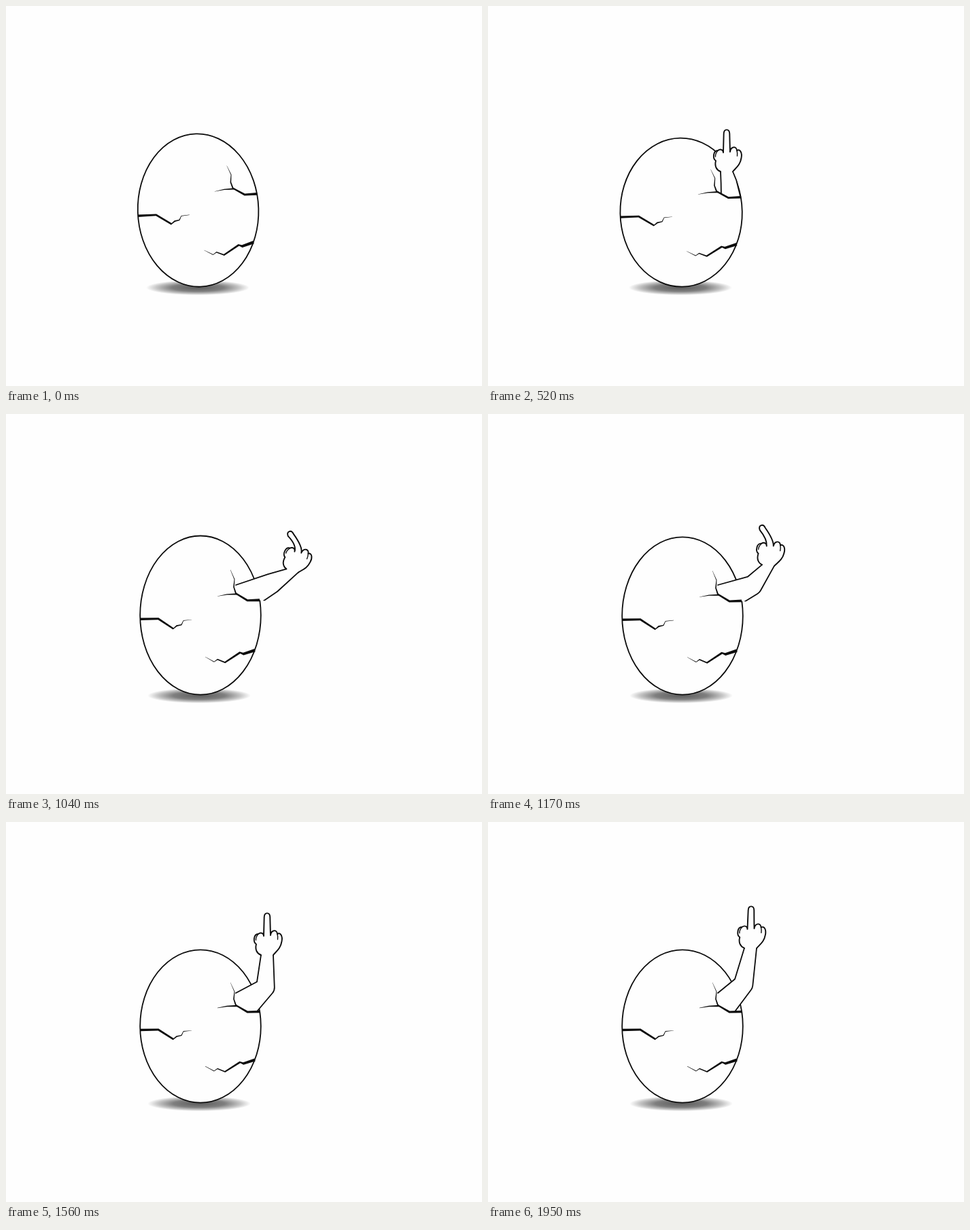
Recreate the animation shown at these times as an HTML page with a canvas. Size 700 by 560 pixels, loop 2340 ms.

```html
<!DOCTYPE html>
<html lang="en">
<head>
<meta charset="utf-8">
<title>Hatching egg</title>
<style>
  html, body { margin: 0; width: 100%; height: 100%; overflow: hidden; background: #fefefe; }
  canvas { display: block; width: 700px; height: 560px; }
</style>
</head>
<body>
<canvas id="stage" width="700" height="560"></canvas>
<script>
const ctx = document.getElementById('stage').getContext('2d');
const PAPER = '#fefefe', INK = '#0c0c0c';
const STEP = 130, STEPS = 18;

// centre lines, from the thick end to the tip
const sideCrack = [[197, 306.5], [224, 306], [246, 320], [251, 316], [258, 314.5], [261, 308.5], [273, 307.3]];
const lowCrack = [[366, 350.5], [349, 356], [344, 354], [322, 368], [311, 363.5], [306, 367], [293, 360]];
const mouth = [[373, 279.5], [355, 280], [338, 270], [335, 261], [336, 250], [330, 236.5]];
const mouthTip = [[340, 271], [325, 271.5], [311, 274]];
const opening = [[300, -50], [300, 230], ...mouth.slice().reverse(), [700, 330], [700, -50]];

// the arm moves evenly between these
const keys = [
  { step: 2,  elbow: [354, 325], wrist: [354, 310], turn: 0,   bend: 0 },
  { step: 4,  elbow: [354, 259], wrist: [351, 244], turn: 0,   bend: 0 },
  { step: 6,  elbow: [353, 246], wrist: [349, 222], turn: -22, bend: 0 },
  { step: 8,  elbow: [392, 249], wrist: [421, 231], turn: 17,  bend: -39 },
  { step: 10, elbow: [389, 254], wrist: [403, 215], turn: -6,  bend: -18 },
  { step: 12, elbow: [382, 242], wrist: [384, 196], turn: 0,   bend: 0 },
  { step: 15, elbow: [376, 238], wrist: [386, 186], turn: 1,   bend: 0 }
];

const clamp = (v, lo, hi) => Math.min(hi, Math.max(lo, v));
const lerp = (a, b, t) => a + (b - a) * t;
const lerp2 = (a, b, t) => [lerp(a[0], b[0], t), lerp(a[1], b[1], t)];
const unit = (a, b) => {
  const dx = b[0] - a[0], dy = b[1] - a[1], d = Math.hypot(dx, dy) || 1;
  return [dx / d, dy / d];
};

function armAt(step) {
  const s = Math.min(step, keys[keys.length - 1].step);
  const i = Math.max(1, keys.findIndex(k => k.step >= s));
  const a = keys[i - 1], b = keys[i], t = (s - a.step) / (b.step - a.step);
  return {
    elbow: lerp2(a.elbow, b.elbow, t),
    wrist: lerp2(a.wrist, b.wrist, t),
    turn: lerp(a.turn, b.turn, t),
    bend: lerp(a.bend, b.bend, t)
  };
}

// the egg ducks, then stretches, while its lean straightens out
function eggAt(step) {
  let stretch = 1;
  if (step > 1 && step < 5) stretch -= .04 * Math.sin(Math.PI * (step - 1) / 4);
  if (step > 5 && step < 10) stretch += .04 * Math.sqrt(Math.sin(Math.PI * (step - 5) / 5));
  return { stretch, lean: .0043 * clamp(8 - step, 0, 7) };
}

function trace(points) {
  ctx.beginPath();
  for (const p of points) ctx.lineTo(...p);
}

function fillPaper() {
  ctx.fillStyle = PAPER;
  ctx.fill();
}

function drawCrack(line, width) {
  const last = line.length - 1;
  const side = sign => line.map(([x, y], i) => {
    const [dx, dy] = unit(line[Math.max(0, i - 1)], line[Math.min(last, i + 1)]);
    const w = sign * (width * (1 - i / last) + .3) / 2;
    return [x - dy * w, y + dx * w];
  });
  trace([...side(1), ...side(-1).reverse()]);
  ctx.fillStyle = INK;
  ctx.fill();
}

function drawShadow(x) {
  const g = ctx.createRadialGradient(0, 0, 0, 0, 0, 76);
  g.addColorStop(0, 'rgba(0,0,0,.64)');
  g.addColorStop(.5, 'rgba(0,0,0,.5)');
  g.addColorStop(.8, 'rgba(0,0,0,.22)');
  g.addColorStop(1, 'rgba(0,0,0,0)');
  ctx.setTransform(1, 0, 0, 11.2 / 76, x, 415);
  ctx.fillStyle = g;
  ctx.beginPath();
  ctx.arc(0, 0, 76, 0, Math.PI * 2);
  ctx.fill();
}

function drawArm({ elbow, wrist, turn }) {
  // 0: straight up inside the shell, 1: leaning out of it
  const out = clamp((elbow[0] - 354) / 22, 0, 1);
  const inner = lerp2([343, 284], [338, 252], out);
  const outer = lerp2([372, 284], [Math.min(elbow[0] - 12, 375), 278], out);

  const upper = unit(lerp2(inner, outer, .5), elbow), fore = unit(elbow, wrist);
  const [dx, dy] = unit([0, 0], [upper[0] + fore[0], upper[1] + fore[1]]);
  const w = 11.5 + 3 * out;
  const a = turn * Math.PI / 180;
  const cuff = r => [wrist[0] + r * Math.cos(a), wrist[1] + r * Math.sin(a)];

  const back = () => {
    ctx.moveTo(...inner);
    ctx.lineTo(elbow[0] + dy * w, elbow[1] - dx * w);
    ctx.lineTo(...cuff(-9));
  };
  const front = () => {
    ctx.arcTo(elbow[0] - dy * w, elbow[1] + dx * w, ...outer, 12);
    ctx.lineTo(...outer);
  };
  ctx.beginPath();
  back();
  ctx.lineTo(...cuff(9));
  front();
  ctx.lineTo(350, 284);
  fillPaper();
  ctx.beginPath();
  back();
  ctx.moveTo(...cuff(9));
  front();
  ctx.lineWidth = 1.8;
  ctx.stroke();
}

function drawHand({ wrist, turn, bend }) {
  const a = bend * Math.PI / 180, c = Math.cos(a), s = Math.sin(a);
  const spin = (x, y) => [x * c - (y + 28) * s, x * s + (y + 28) * c - 28];

  ctx.translate(...wrist);
  ctx.rotate(turn * Math.PI / 180);
  ctx.beginPath();
  ctx.moveTo(-9, 0);
  ctx.bezierCurveTo(-15, -2, -18, -8, -16, -16);
  ctx.bezierCurveTo(-21, -19, -20, -31, -13, -31);
  ctx.bezierCurveTo(-9, -34, -5, -32, -5, -28);
  ctx.quadraticCurveTo(-4.8, -38, ...spin(-4.3, -56));
  ctx.bezierCurveTo(...spin(-4, -63.5), ...spin(4, -63.5), ...spin(4.3, -56));
  ctx.quadraticCurveTo(4.7, -38, 5, -29);
  ctx.bezierCurveTo(6, -37.5, 14.5, -38, 15, -31);
  ctx.bezierCurveTo(20, -34, 23, -27, 21.5, -20);
  ctx.bezierCurveTo(20, -10, 14, -6, 9, 0);
  fillPaper();
  ctx.lineWidth = 1.9;
  ctx.stroke();

  // creases between the fingers
  ctx.beginPath();
  ctx.moveTo(-13, -31);
  ctx.quadraticCurveTo(-17, -26, -16.5, -22);
  ctx.moveTo(15, -31);
  ctx.quadraticCurveTo(16, -27, 15.5, -23);
  ctx.lineWidth = 1.4;
  ctx.stroke();
}

function draw(step) {
  const { stretch, lean } = eggAt(step);
  const shell = new DOMMatrix().translate(286, 414).rotate(-lean * 180 / Math.PI)
    .scale(Math.max(1, 1 + (1 - stretch) * .35), stretch).translate(-286, -414);

  ctx.setTransform(1, 0, 0, 1, 0, 0);
  ctx.fillStyle = PAPER;
  ctx.fillRect(0, 0, 700, 560);
  ctx.strokeStyle = INK;
  ctx.lineJoin = ctx.lineCap = 'round';
  drawShadow(284 - lean * 66);

  ctx.setTransform(shell);
  ctx.beginPath();
  ctx.ellipse(286, 301, 88.8, 112.7, 0, 0, Math.PI * 2);
  fillPaper();
  ctx.lineWidth = 1.8;
  ctx.stroke();

  if (step >= keys[0].step) {
    const arm = armAt(step);
    ctx.save();
    trace(opening);
    ctx.clip();
    ctx.setTransform(1, 0, 0, 1, 0, 0);
    drawArm(arm);
    drawHand(arm);
    ctx.restore();
  }

  ctx.setTransform(shell);
  drawCrack(sideCrack, 3.2);
  drawCrack(lowCrack, 4);
  drawCrack(mouth, 3.4);
  drawCrack(mouthTip, 2);
}

const start = performance.now();
function tick() {
  const elapsed = Math.max(0, performance.now() - start);
  draw(Math.floor(elapsed / STEP) % STEPS);
  requestAnimationFrame(tick);
}
tick();
</script>
</body>
</html>
```
